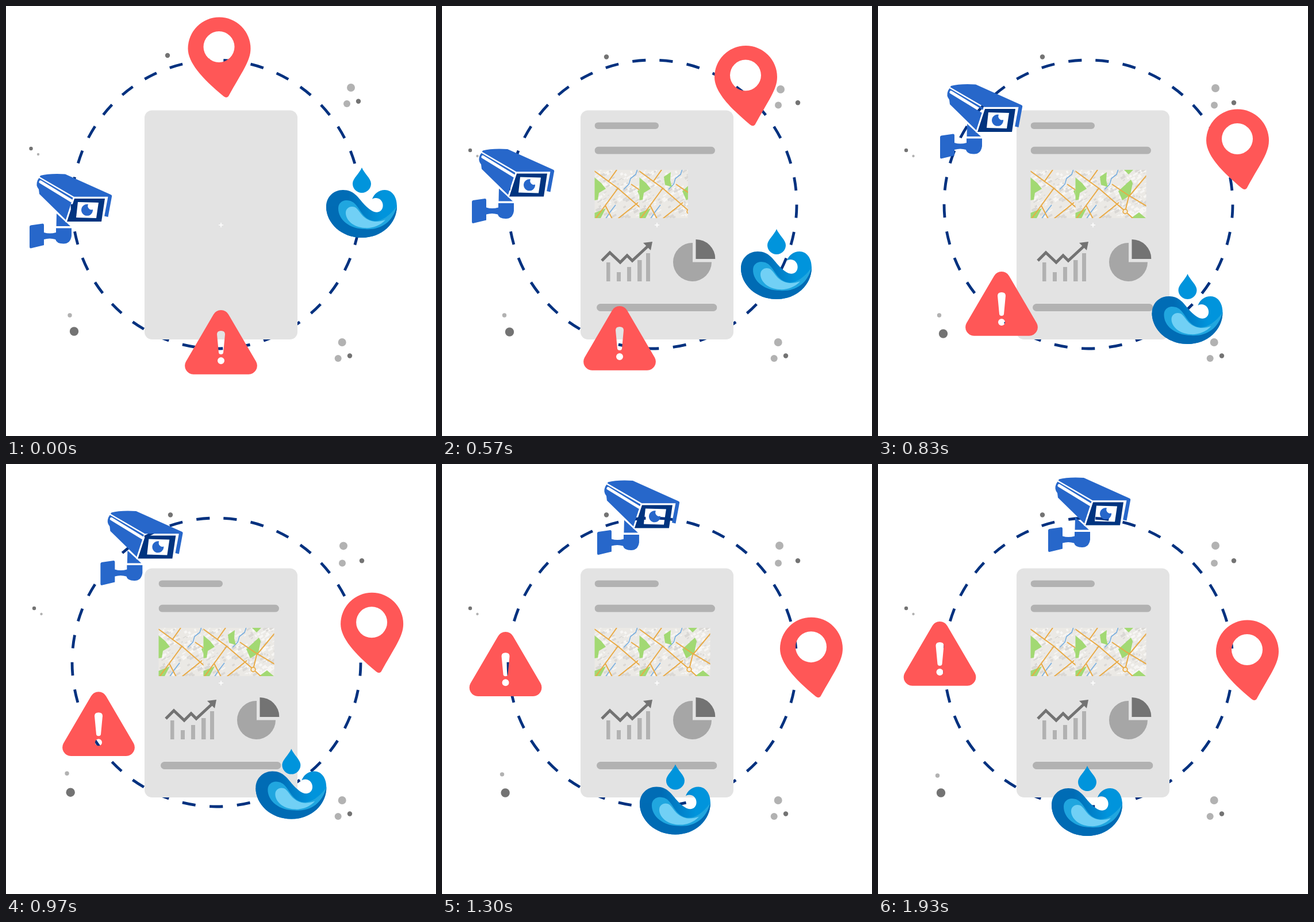
These frames come from a looping animation (748x748 px, 2.01 s). An HTML page:

```html
<!DOCTYPE html>
<html lang="en">
<head>
<meta charset="utf-8">
<title>Report orbit</title>
<style>
html, body { margin: 0; width: 100%; height: 100%; overflow: hidden; background: #fff; }
svg { display: block; width: 100vw; height: 100vh; }
.red { fill: #ff5757; fill-rule: evenodd; }
.light { fill: #b2b2b2; }
.dark { fill: #737373; }
.road { fill: none; stroke: #e9aa45; stroke-width: 2; }
.river { fill: none; stroke: #77aee0; stroke-width: 1.6; }
.park { fill: #a2d973; }
</style>
</head>
<body>
<svg viewBox="0 0 748 748">
  <defs>
    <linearGradient id="sea" gradientUnits="userSpaceOnUse" x1="595" y1="0" x2="655" y2="0">
      <stop stop-color="#006cb5"/><stop offset="1" stop-color="#0094dc"/>
    </linearGradient>
    <mask id="seams" maskUnits="userSpaceOnUse" x="30" y="280" width="170" height="160">
      <path fill="#fff" d="M30 280h170v160H30z"/>
      <path fill="none" stroke="#000" stroke-width="2.5" d="M56 297L118 333H176L169 370M118 333L104 376"/>
      <path stroke="#000" stroke-width="5" stroke-linecap="round" d="M60 306L114 339"/>
    </mask>
    <clipPath id="mapBox"><path d="M265.5 285h210v84h-210z"/></clipPath>
    <clipPath id="tileBox"><path d="M265.5 285h123v84h-123z"/></clipPath>
    <g id="tile" clip-path="url(#tileBox)">
      <path fill="#ebe9e5" d="M265 285h124v84H265z"/>
      <path id="blocksLight" fill="#f7f6f4"/>
      <path id="blocksDark" fill="#dad8d5"/>
      <path class="park" d="M265 298l12 10 8 10-12 7-2 12-6 1zM340 322l22-20 3 6-4 21-14 9zM265 360l20-8-9 17h-11zM350 285h16l-8 8zM362 369l14-10 12 10z"/>
      <path class="river" d="M316 319l9-9 3-10 9-7 3-9"/>
      <path class="river" stroke-width="4" d="M284 371l8-12 10-13"/>
      <path class="road" d="M265 287L306 317 352 357 366 370M304 285L289 306M306 317L284 347 267 370M284 347L296 370M352 357L358 332 389 295M329 310L354 327 399 354M306 370L341 342"/>
      <circle cx="352" cy="357.500" r="3.800" fill="#f4ecdc" stroke="#e9aa45" stroke-width="1.800"/>
    </g>
  </defs>

  <circle id="ring" cx="366" cy="345" r="251" fill="none" stroke="#00317f" stroke-width="4.800"/>
  <rect x="241" y="181.500" width="266" height="398.500" rx="13" fill="#e3e3e3"/>
  <path stroke="#fff" stroke-width="1.500" d="M370 381h8M374 377v8"/>

  <rect class="wipe light" x="265.500" y="202.500" width="111.500" height="11.500" rx="5.750"/>
  <rect class="wipe light" x="265.500" y="244.800" width="209.500" height="12.800" rx="6.400"/>
  <g class="wipe">
    <path fill="#a6a6a6" d="M436 412A33.500 33.500 0 1 0 469 445.500H436z"/>
    <path class="dark" d="M441.500 406A34 34 0 0 1 475.500 440h-34z"/>
  </g>
  <g class="wipe">
    <path class="light" d="M286 446h6.500v33H286zM304 463h7v16h-7zM322 454h7v25h-7zM340 442h7.500v37H340zM355 430h7v49h-7z"/>
    <path fill="none" stroke="#737373" stroke-width="5" d="M278 443L292 429 310 446 322 434 331 443 359 417"/>
    <path class="dark" d="M350 412L366 410 363 425z"/>
  </g>
  <rect class="wipe light" x="269" y="518" width="209.500" height="13" rx="6.500"/>
  <g class="wipe"><g clip-path="url(#mapBox)">
    <use href="#tile"/><use href="#tile" x="78"/>
    <path class="park" d="M386 297l12-8-1 14 3 12-12-4z"/>
  </g></g>

  <g id="camera"><g mask="url(#seams)" fill="#2767ca">
    <path d="M60 295Q75 291 103 292.500L182 328Q185 329 184 332L177.500 367 169 365 176 333H118L105 373 58 327 57 319Q51 312 55 303z"/>
    <path fill="#00347f" fill-rule="evenodd" d="M119 335H172L166 375H106zM125 341L122 368 157 369 161 342z"/>
    <path d="M143 345A10 10 0 1 0 151 354A6.500 6.500 0 0 1 143 345z"/>
    <path d="M88 361L112 383H87.500zM87 386.500H114V400Q112 413.500 100 413.500T86 406Q76 403 66 406V416L43 421.500Q41 421.500 41 419V384Q41 382 43 381.500L64 378.500Q66 378.500 66 381V394Q76 397 87 394z"/>
  </g></g>
  <path id="pin" class="red" d="M316.500 74A54.500 54.500 0 0 1 425.500 74C425.500 96 410 115 387 157Q383.500 161 378.500 157C340 125 316.500 98 316.500 74zM343.500 71a27 27 0 1 0 54 0a27 27 0 1 0-54 0z"/>
  <path id="alert" class="red" d="M361 536.400A15 15 0 0 1 387 536.400L435 618.400A15 15 0 0 1 422 640.700H326A15 15 0 0 1 313 618.400zM367 571Q367 565 374 565T381 571L378 603Q377.500 606 374 606T370 603zM368 617a6 6 0 1 0 12 0a6 6 0 1 0-12 0z"/>
  <g id="wave">
    <path fill="#0094dc" d="M619 281C623 291 635 300 635 309A16 16 0 0 1 603 309C603 300 615 291 619 281z"/>
    <path fill="url(#sea)" d="M557 349C557 332 570 320 586 320C606 320 612 333 624 346C636 358 645 362 652 356C659 350 656 334 643 334Q639 334 637 336C640 327 648 320 659 320C671 320 680 331 680 348C680 378 654 403 619 403C584 403 557 378 557 349z"/>
    <path fill="#006bb4" d="M557 349C557 378 584 403 619 403C654 403 680 378 680 348C668 374 650 388 625 387C595 386 580 365 578 348z"/>
    <path fill="#20a6df" d="M578 352C578 343 585 338 592 338C608 338 612 352 622 364C636 380 658 378 680 348C672 378 650 390 625 388C598 388 578 372 578 352z"/>
    <path fill="#71d0f5" d="M591 360C591 353 596 349 602 349C612 349 614 360 624 368C634 376 646 377 660 372C650 383 636 387 624 386C604 385 591 372 591 360z"/>
  </g>
  <g id="dots"></g>
</svg>
<script>
const LOOP = 2010, STEP = 100 / 3, LAST = 58;
const KEYS = [0, 11, 17, 25, 34, 46, 58];   // in steps
const $ = s => document.querySelector(s);

function add(parent, tag, attrs) {
  const el = document.createElementNS("http://www.w3.org/2000/svg", tag);
  for (const k in attrs) el.setAttribute(k, attrs[k]);
  return parent.appendChild(el);
}

// Monotone cubic through values at KEYS; a short list holds its last value.
function track(list) {
  const v = KEYS.map((_, i) => list[Math.min(i, list.length - 1)]);
  const slope = i => (v[i + 1] - v[i]) / (KEYS[i + 1] - KEYS[i]);
  const tangent = KEYS.map((_, i) => {
    if (!i || i === KEYS.length - 1) return 0;
    const a = slope(i - 1), b = slope(i);
    return a * b > 0 ? 2 * a * b / (a + b) : 0;
  });
  return n => {
    let i = 0;
    while (i < KEYS.length - 2 && n >= KEYS[i + 1]) i++;
    const h = KEYS[i + 1] - KEYS[i], s = (n - KEYS[i]) / h, q = 1 - s;
    return v[i] * (1 + 2 * s) * q * q + v[i + 1] * s * s * (3 - 2 * s)
      + h * s * q * (tangent[i] * q - tangent[i + 1] * s);
  };
}

const movers = [];
const move = (el, xs, ys) => movers.push({ el, x: track(xs), y: track(ys) });

move($("#pin"), [0, 61, 157.5, 254.5, 271.5], [0, 9, 49.5, 160, 239, 252]);
move($("#alert"), [0, 0, -65, -159, -258, -266.5], [0, 0, -7, -67, -209, -255]);
move($("#camera"), [0, 0, 11, 67, 192.5, 255], [0, 0, -43.5, -156, -255, -268.5]);
move($("#wave"), [0, -6, -37, -80.5, -177.5, -244, -255], [0, 27, 107, 185, 237, 244]);

// x, y, radius, shade, drift in x, drift in y
for (const [cx, cy, r, shade, xs = [0], ys = [0]] of [
  [281, 86, 4.2, "dark", [0, 5], [0, 2.5]],
  [600, 142, 7, "light", [0, -10, -11, -13], [0, 3, 3, 1, 0]],
  [593, 170, 6, "light", [0, -7, -8], [0, 1, 2.5]],
  [613, 165.7, 4.2, "dark", [0, 6], [0, 2.5]],
  [43.5, 248, 3.2, "dark", [0, .5, 5.5], [0, 0, 3]],
  [56, 258, 2.2, "light", [0, 0, 5.5], [0, 0, 3]],
  [111, 538, 3.7, "light", [0, 0, -2.5, -4.5, -5.5, -7.5], [0, 0, 0, 0, 1, 3, 4]],
  [118.5, 566, 7.7, "dark", [0, 0, -1, -5, -7.5, -9], [0, 0, 1, 4, 6]],
  [584.7, 585, 7, "light"],
  [577.7, 613, 6, "light"],
  [598, 608.5, 4.2, "dark"],
]) move(add($("#dots"), "circle", { cx, cy, r, class: shade }), xs, ys);

// 33 dashes, with a gap centred at the top
const pitch = 2 * Math.PI * 251 / 33, dash = 23.2;
$("#ring").setAttribute("stroke-dasharray", `${dash} ${pitch - dash}`);
$("#ring").setAttribute("transform", `rotate(${-90 + 180 / 33 * (1 - dash / pitch)} 366 345)`);

// Left-to-right reveals: left edge, width, first step
const wipes = [
  [265.5, 111.5, 1], [265.5, 209.5, 1.8], [402, 73.5, 2.6],
  [276, 90, 3.8], [269, 209.5, 5], [265.5, 210, 8.7],
].map(([x, width, start], i) => {
  const clip = add($("defs"), "clipPath", { id: "wipe" + i });
  document.querySelectorAll(".wipe")[i].setAttribute("clip-path", `url(#wipe${i})`);
  return { box: add(clip, "rect", { x, y: 180, width: 0, height: 400 }), width, start };
});

// Slanted city blocks on the map
let seed = 7;
const rand = () => (seed = seed * 16807 % 2147483647) / 2147483647;
function blocks(count) {
  let d = "";
  while (count--) {
    const x = 265 + rand() * 124, y = 285 + rand() * 84, w = 2 + rand() * 6, h = 1 + rand() * 3;
    d += `M${x} ${y}l${w} ${-w * .6} ${h * .6} ${h} ${-w} ${w * .6}z`;
  }
  return d;
}
$("#blocksLight").setAttribute("d", blocks(150));
$("#blocksDark").setAttribute("d", blocks(90));

function draw() {
  const n = Math.min(LAST, Math.floor((performance.now() % LOOP + 3.4) / STEP));
  for (const m of movers) m.el.setAttribute("transform", `translate(${m.x(n)} ${m.y(n)})`);
  for (const w of wipes) {
    const p = Math.max(0, Math.min(1, (n - w.start) / 12));
    w.box.setAttribute("width", w.width * p * p * (3 - 2 * p));
  }
  requestAnimationFrame(draw);
}
draw();
</script>
</body>
</html>
```
